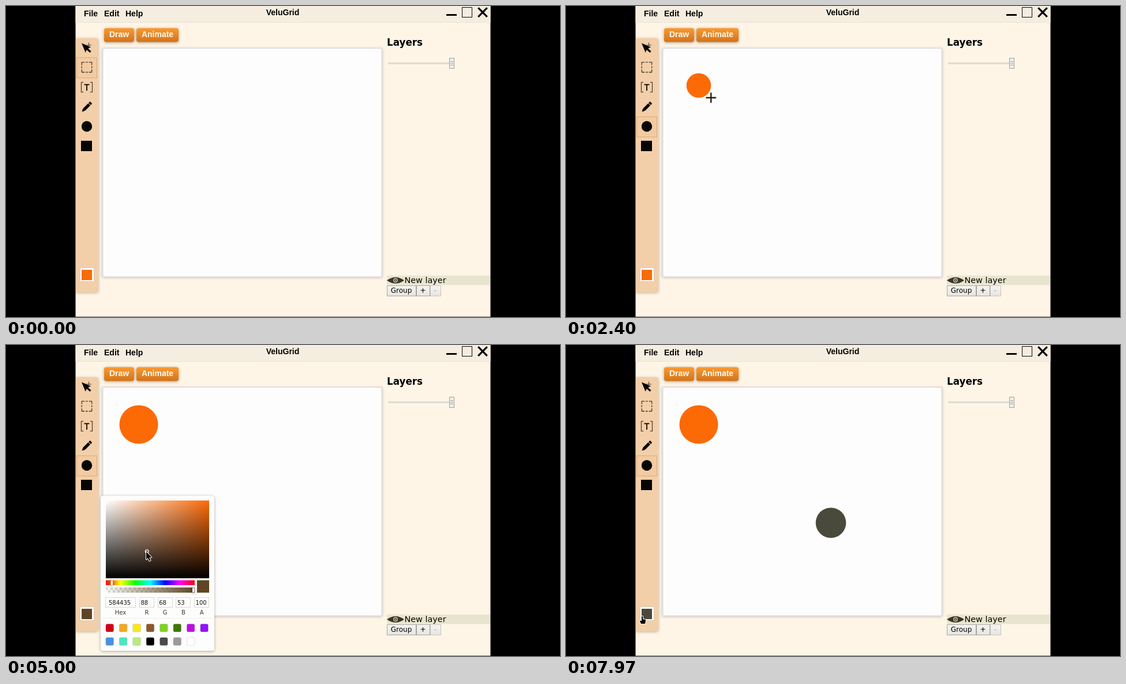
Animation of 960x540 px, one loop 8000 ms. Source, as an HTML page with a canvas:

```html
<!DOCTYPE html>
<html lang="en">
<head>
<meta charset="utf-8">
<title>Drawing app demo</title>
<style>
  html, body { margin: 0; width: 100%; height: 100%; overflow: hidden; background: #000; }
  canvas { display: block; }
</style>
</head>
<body>
<canvas id="stage" width="960" height="540"></canvas>
<script>
const ctx = document.getElementById('stage').getContext('2d');
const LOOP = 8000;
const INK = '#060504', LINE = '#443a2a', PAPER = '#fdfdfd';
const UI = '700 14px "Liberation Sans", Arial, sans-serif';
const sans = (size, weight = 400) => `${weight} ${size}px "DejaVu Sans", Verdana, sans-serif`;

const ORANGE = { hex: 'F17013', css: '#fc6a06' };
const BROWN = { hex: '584435', css: '#5e4624' };
const GREY = { hex: '4A4A4A', css: '#4a4a3c' };

const TOOL_TOP = 55, TOOL_STEP = 34.2;
const toolY = i => TOOL_TOP + 17.5 + i * TOOL_STEP;

// Circles grow from the centre while the pointer drags outwards.
const CIRCLES = [
  { x: 230, y: 138, r: 33.5, from: 2070, to: 2630, paint: ORANGE },
  { x: 459, y: 308.7, r: 26.3, from: 6100, to: 6680, paint: GREY }
];

const PICK_TOOL = 1180, OPEN = 3620, PICK_SHADE = 4830, PICK_PRESET = 5380, CLOSE = 5600;
const START = { x: 848, y: 470 };
const centre = c => ({ x: c.x, y: c.y });
const rim = c => ({ x: c.x + c.r, y: c.y + c.r });

const MOVES = [
  { from: 300, to: 1150, at: { x: 128, y: 206 } },
  { from: 1230, to: 1830, at: centre(CIRCLES[0]) },
  { from: 2070, to: 2630, at: rim(CIRCLES[0]) },
  { from: 2770, to: 3100, at: { x: 692, y: 163 } },
  { from: 3100, to: 3570, at: { x: 134, y: 474 } },
  { from: 3680, to: 4230, at: { x: 205, y: 417 } },
  { from: 4260, to: 4800, at: { x: 243, y: 359 } },
  { from: 5030, to: 5280, at: { x: 272, y: 510 } },
  { from: 5400, to: 5950, at: centre(CIRCLES[1]) },
  { from: 6100, to: 6680, at: rim(CIRCLES[1]) },
  { from: 6870, to: 7670, at: { x: 132, y: 471 } }
];

function ease(t, from, to) {
  const u = Math.min(1, Math.max(0, (t - from) / (to - from)));
  return u * u * (3 - 2 * u);
}

function pointerAt(t) {
  return MOVES.reduce((p, m) => {
    const s = ease(t, m.from, m.to);
    return { x: p.x + (m.at.x - p.x) * s, y: p.y + (m.at.y - p.y) * s };
  }, START);
}

function rect(x, y, w, h, fill, stroke) {
  if (fill) { ctx.fillStyle = fill; ctx.fillRect(x, y, w, h); }
  if (stroke) {
    ctx.strokeStyle = stroke;
    ctx.lineWidth = 1;
    ctx.strokeRect(x + .5, y + .5, w - 1, h - 1);
  }
}

function round(x, y, w, h, r, fill, shadow) {
  ctx.save();
  if (shadow) { ctx.shadowColor = shadow; ctx.shadowBlur = 5; ctx.shadowOffsetY = 1; }
  ctx.fillStyle = fill;
  ctx.beginPath();
  ctx.roundRect(x, y, w, h, r);
  ctx.fill();
  ctx.restore();
}

function circle(x, y, r, fill, stroke, width) {
  ctx.beginPath();
  ctx.arc(x, y, r, 0, Math.PI * 2);
  if (fill) { ctx.fillStyle = fill; ctx.fill(); }
  if (stroke) { ctx.strokeStyle = stroke; ctx.lineWidth = width; ctx.stroke(); }
}

function line(x0, y0, x1, y1, color, width) {
  ctx.strokeStyle = color;
  ctx.lineWidth = width;
  ctx.beginPath();
  ctx.moveTo(x0, y0);
  ctx.lineTo(x1, y1);
  ctx.stroke();
}

function plus(x, y, r, color, width) {
  line(x - r, y, x + r, y, color, width);
  line(x, y - r, x, y + r, color, width);
}

function text(str, x, y, font, fill = '#000', align = 'left') {
  ctx.font = font;
  ctx.fillStyle = fill;
  ctx.textAlign = align;
  ctx.fillText(str, x, y);
}

function ramp(x0, y0, x1, y1, colors) {
  const g = ctx.createLinearGradient(x0, y0, x1, y1);
  colors.forEach((c, i) => g.addColorStop(i / (colors.length - 1), c));
  return g;
}

// Runs a drawing step with its own origin and rotation.
function place(x, y, angle, step) {
  ctx.save();
  ctx.translate(x, y);
  ctx.rotate(angle);
  step();
  ctx.restore();
}

const ARROW = new Path2D('M0 0V13.5L3 10.7L5.3 16L7.6 15L5.3 9.9L9.4 9.6Z');
const HAND = new Path2D('M-1 0H1V5L6 6V9L5 13H-2L-4.5 7.5L-1 8Z');

function drawWindow() {
  rect(0, 0, 960, 540, '#000');
  rect(120.5, 0, 719, 539.5, '#fef5e6');
  rect(120.5, 0, 719, 28, '#f5eee0');
  rect(120.5, 28, 719, 1, '#ece2d2');

  text('File', 135, 18, UI);
  text('Edit', 170, 18, UI);
  text('Help', 207, 18, UI);
  text('VeluGrid', 479.5, 15.5, UI, '#000', 'center');
  rect(763, 14, 18, 3, INK);
  rect(790, 2, 18, 18, null, INK);
  place(826, 11, Math.PI / 4, () => plus(0, 0, 11, INK, 3.2));

  [['Draw', 170, 52], ['Animate', 226, 73]].forEach(([label, x, w]) => {
    round(x, 38.5, w, 24, 4, ramp(0, 38, 0, 63, ['#fb9a32', '#d2721a']), 'rgba(110,80,50,.55)');
    text(label, x + w / 2, 54, UI, '#fffaf0', 'center');
  });
}

function drawTools(selected, swatch) {
  round(121, 56, 39, 441, [0, 4, 4, 0], '#f2cfa8', 'rgba(120,100,80,.5)');
  rect(122, toolY(selected) - 17.5, 36, 36, '#f3cba2', '#e0a878');

  place(131, 64.5, -.39, () => {
    ctx.scale(1.3, 1.3);
    ctx.fillStyle = INK;
    ctx.fill(ARROW);
  });
  plus(143.5, 68, 4.5, LINE, 1);

  // Marquee, drawn as one quarter-turned side
  for (let side = 0; side < 4; side++) {
    place(140, 106.3, side * Math.PI / 2, () => {
      ctx.setLineDash([5, 2, 3.5, 2]);
      line(-8.7, -8.7, 8.7, -8.7, LINE, 1.3);
    });
  }

  for (const side of [-1, 1]) {
    const x = 140 + side * 9.5;
    line(x, 132, x, 150, LINE, 1.2);
    line(x, 132.5, x - side * 3.5, 132.5, LINE, 1.2);
    line(x, 149.5, x - side * 3.5, 149.5, LINE, 1.2);
  }
  line(135.5, 136.5, 144.5, 136.5, INK, 1.8);
  line(140, 136.5, 140, 147, INK, 1.8);

  place(140, toolY(3), -Math.PI / 4, () => {
    rect(-7, -2.6, 13, 5.2, INK);
    rect(7, -2.6, 3.5, 5.2, INK);
    ctx.fill(new Path2D('M-7 -2.6L-12 0L-7 2.6Z'));
  });
  circle(140, 209, 9.2, INK);
  rect(130, 234, 19, 18, INK);

  rect(128, 454, 25, 25, PAPER, '#dcc8b4');
  rect(131, 458, 18, 18, swatch);
}

function drawLayers() {
  text('Layers', 660, 68.5, sans(16.8, 700));
  rect(662, 98, 108, 3, '#e9e5dc', '#d9d5cc');
  rect(768, 90, 9, 19, '#efeeec', '#a3a09a');
  for (let y = 96; y <= 102; y += 3) rect(770, y, 5, 1, '#a3a09a');

  rect(660, 468, 179, 16.5, '#e8e5cf');
  ctx.fillStyle = '#3c3428';
  ctx.fill(new Path2D('M660 476.5Q675 465.5 690 476.5Q675 487 660 476.5'));
  circle(675, 476.3, 3.2, null, '#e2dfd0', 1.3);
  circle(675, 476.3, 1.1, '#e2dfd0');
  text('New layer', 690.5, 481.3, sans(14.4));

  [['Group', 660, 51], ['+', 711, 24], ['-', 735, 19]].forEach(([label, x, w]) => {
    const off = label === '-';
    rect(x, 485, w, 19, ramp(0, 485, 0, 504, ['#f6f5f2', '#e6e4df']), off ? '#c8c5c0' : '#a8a5a0');
    text(label, x + w / 2 - .5, 498.3, sans(12), off ? '#9a9890' : '#000', 'center');
  });
}

function drawCanvas(t) {
  round(167, 72.5, 485, 398.5, 0, '#dcdae0', 'rgba(110,105,115,.4)');
  rect(168.5, 74, 482, 395.5, PAPER);
  CIRCLES.forEach(c => circle(c.x, c.y, c.r * ease(t, c.from, c.to), c.paint.css));
}

function drawPicker(paint) {
  const { hex, css } = paint;
  const rgb = [0, 2, 4].map(i => parseInt(hex.substr(i, 2), 16));
  round(164, 262, 197, 269, 4, PAPER, 'rgba(100,95,90,.55)');

  rect(173, 270, 179, 135, ramp(173, 0, 352, 0, ['#fff', ORANGE.css]));
  rect(173, 270, 179, 135, ramp(0, 270, 0, 405, ['rgba(0,0,0,0)', '#000']));
  // The marker sits at the paint's saturation and value.
  const high = Math.max(...rgb), low = Math.min(...rgb);
  circle(173 + 179 * (1 - low / high), 270 + 135 * (1 - high / 255), 2.8, null, '#fffbe8', 1.3);

  const hues = Array.from({ length: 7 }, (_, i) => `hsl(${i * 60} 100% 50%)`);
  rect(173, 408.5, 154, 8.5, ramp(173, 0, 327, 0, hues));
  for (let x = 173, row = 0; x < 327; x += 4, row ^= 1) {
    rect(x, 421 + row * 4.5, Math.min(4, 327 - x), 4.5, '#dedcd8');
  }
  rect(173, 421, 154, 9, ramp(173, 0, 327, 0, [css + '00', css]));
  round(181.5, 409, 3.5, 8, 1, '#fff', 'rgba(0,0,0,.6)');
  round(323, 421.5, 3.5, 8, 1, '#fff', 'rgba(0,0,0,.6)');
  rect(331, 408.5, 21, 21.5, css);

  const values = [hex, ...rgb, 100];
  ['Hex', 'R', 'G', 'B', 'A'].forEach((label, i) => {
    const x = i ? 199.3 + i * 31.7 : 172, w = i ? 26 : 53;
    rect(Math.round(x), 438, w, 18, PAPER, '#dcd8cc');
    text(values[i], x + (i ? 2.5 : 6), 451, sans(10), '#111');
    text(label, x + w / 2, 468, sans(10), '#3a372c', 'center');
  });
  rect(165, 474, 195, 1, '#efede4');

  const presets = ['#d0021b', '#f5a623', '#f8e71c', '#8b572a', '#7ed321', '#417505', '#bd10e0', '#9013fe',
    '#4a90e2', '#50e3c2', '#b8e986', '#000', '#4a4a4a', '#9b9b9b', '#fff'];
  presets.forEach((color, i) => {
    const x = 172.5 + (i % 8) * 23.4, y = 484 + Math.floor(i / 8) * 23.5;
    round(x, y, 14.5, 14.5, 3, 'rgba(60,55,45,.25)');
    round(x + .6, y + .6, 13.3, 13.3, 2.5, color);
  });
}

function drawPointer(t, open) {
  if (t < MOVES[0].from) return;
  const { x, y } = pointerAt(t);
  const inside = (l, top, r, b) => x > l && x < r && y > top && y < b;

  if (inside(168, 73, 651, 470) && !(open && inside(164, 262, 361, 531))) {
    plus(x, y, 9.5, '#c9c8b4', 4);
    plus(x, y, 8.5, INK, 1.8);
    return;
  }
  const shape = inside(121, 56, 160, 497) ? HAND : ARROW;
  place(x, y, 0, () => {
    ctx.lineJoin = 'round';
    ctx.strokeStyle = '#fffdf0';
    ctx.lineWidth = 2;
    ctx.stroke(shape);
    ctx.fillStyle = INK;
    ctx.fill(shape);
  });
}

function draw(t) {
  const open = t >= OPEN && t < CLOSE;
  const paint = t < PICK_SHADE ? ORANGE : t < PICK_PRESET ? BROWN : GREY;
  drawWindow();
  drawTools(t < PICK_TOOL ? 1 : 4, paint.css);
  drawLayers();
  drawCanvas(t);
  if (open) drawPicker(paint);
  drawPointer(t, open);
}

const start = performance.now();
function tick() {
  draw((performance.now() - start) % LOOP);
  requestAnimationFrame(tick);
}
tick();
</script>
</body>
</html>
```
